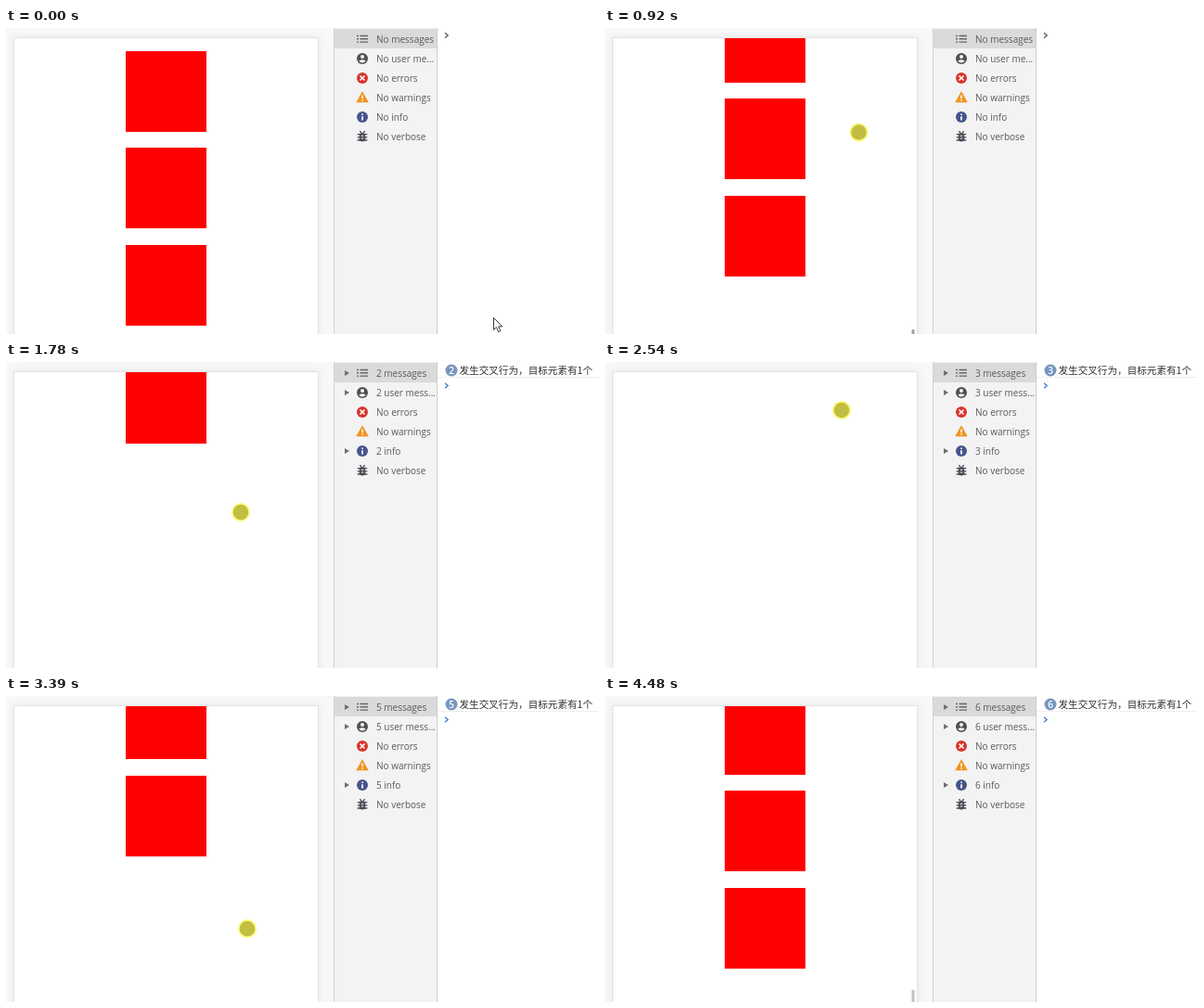
These frames come from a looping animation (639 px wide and 330 px high, 4.57 s). An HTML page:

```html
<!DOCTYPE html>
<html lang="en">
<head>
<meta charset="utf-8">
<title>Intersection demo</title>
<style>
  html, body { margin: 0; width: 100%; height: 100%; overflow: hidden; background: #fff; }
  svg { display: block; width: 639px; height: 330px; }
  .labels { font: 10px "Open Sans", "Noto Sans", sans-serif; fill: #5a5a5a; }
  .log { font: 10.6px "Noto Sans CJK SC", "Noto Sans CJK JP", sans-serif; fill: #303030; }
  .badge { font: 600 10px "Open Sans", sans-serif; fill: #fff; text-anchor: middle; }
  .card { filter: drop-shadow(0 0 5px rgba(0, 0, 0, .07)); }
  .crisp { shape-rendering: crispEdges; }
</style>
</head>
<body>
<svg viewBox="0 0 639 330">
  <defs>
    <clipPath id="view"><rect x="9" y="11" width="327" height="319"/></clipPath>
    <clipPath id="head"><circle r="6"/></clipPath>
  </defs>

  <!-- page -->
  <rect width="353" height="330" fill="#f8f8f8"/>
  <rect class="card" x="8.5" y="10.5" width="328" height="340" fill="#fff" stroke="#e3e3e3"/>
  <g clip-path="url(#view)">
    <g id="boxes" class="crisp" fill="#f00"></g>
    <rect id="thumb" x="330.5" width="3" height="200"/>
  </g>

  <!-- sidebar -->
  <g class="crisp">
    <rect x="353" width="111" height="330" fill="#f3f3f3"/>
    <rect x="354" y="1" width="110" height="21" fill="#dadada"/>
    <rect x="353" width="1" height="330" fill="#d2d2d2"/>
    <rect x="464" width="1" height="330" fill="#cdcdcd"/>
  </g>
  <path id="arrows" fill="#6e6e6e" d="M365 9l5 3-5 3zM365 30l5 3-5 3zM365 93l5 3-5 3z"/>
  <path d="M378 8.5h2m1.5 0h8.5M378 11.8h2m1.5 0h8.5M378 15.1h2m1.5 0h8.5" stroke="#666" stroke-width="1.4"/>
  <g transform="translate(384 33)">
    <circle r="6" fill="#505050"/>
    <g fill="#f3f3f3" clip-path="url(#head)">
      <circle cy="-2" r="2"/>
      <path d="M-3.7 2.6q3.7-2.6 7.4 0q-1.5 2-3.7 2t-3.7-2z"/>
    </g>
  </g>
  <g transform="translate(384 54)">
    <circle r="6" fill="#d8352c"/>
    <path d="M-2.5-2.5l5 5m0-5l-5 5" stroke="#fff" stroke-width="1.6"/>
  </g>
  <g transform="translate(384 75)">
    <path d="M0-6.3L6.3 5H-6.3z" fill="#f0931f" stroke="#f0931f" stroke-width=".6" stroke-linejoin="round"/>
    <path d="M0-2.5v3.7m0 1.1v1.5" stroke="#fff" stroke-width="1.5"/>
  </g>
  <g transform="translate(384 96)">
    <circle r="6" fill="#47558c"/>
    <path d="M0-3.6v1.7m0 1.1v4.2" stroke="#fff" stroke-width="1.7"/>
  </g>
  <g transform="translate(384 117)" stroke="#484a55" fill="none">
    <rect x="-3.2" y="-4" width="6.4" height="9.5" rx="3.2" fill="#484a55" stroke="none"/>
    <path d="M-5.3-2.4H5.3M-5.3.8H5.3M-5.3 4H5.3M-2.7-5.8L-1-4M2.7-5.8L1-4" stroke-width="1.3"/>
    <path d="M-1.3-.7h2.6M-1.3 2h2.6" stroke="#f3f3f3"/>
  </g>
  <g class="labels">
    <text id="messages" x="399" y="16"></text>
    <text id="users" x="399" y="37"></text>
    <text x="399" y="58">No errors</text>
    <text x="399" y="79">No warnings</text>
    <text id="info" x="399" y="100"></text>
    <text x="399" y="121">No verbose</text>
  </g>

  <!-- console -->
  <g id="log">
    <rect class="crisp" x="465" y="16" width="174" height="1" fill="#efefef"/>
    <text id="line" class="log" y="13">发生交叉行为，目标元素有1个</text>
    <g id="badge">
      <circle cx="480" cy="9" r="6.5" fill="#7896bf"/>
      <text id="count" class="badge" x="480" y="12.6"></text>
    </g>
  </g>
  <path id="prompt" d="M473-2.8l3.2 2.8-3.2 2.8" fill="none" stroke-width="1.4"/>

  <!-- pointer -->
  <path id="cursor" d="M.5.5v13l3-2.8 2.2 5 2.2-1-2.2-4.8h4z" fill="#fff" stroke="#222" stroke-width=".9"/>
  <g id="touch">
    <circle id="ring" r="10" fill="#fdfa78"/>
    <circle id="dot" r="8.3"/>
  </g>
</svg>
<script>
  const LOOP = 4570, STEP = 77, LAST = 58, GAP = 104.6;

  // step, pointer x, pointer y, top of the first box
  const path = [
    [0, 525, 312, 24.6], [1, 480, 270, 24.6], [3, 318, 168, 24.6], [4, 293, 165.7, 24.6],
    [9, 293, 219, 77.9], [10, 290, 208, 67], [14, 257, 17, -124],
    [15, 254, 62, -131], [16, 255, 115, -135], [17, 268, 165, -138],
    [19, 290, 232, -138], [21, 270, 195, -175.2], [23, 253, 162, -208.2],
    [26, 255, 98, -272.2], [27, 256.5, 86, -300], [28, 257, 91, -322.4],
    [31, 256, 52, -322.4], [33, 255, 52, -322.4], [39, 257, 174, -200.4],
    [44, 260, 251, -123.4], [46, 262, 283, -91.4], [53, 268, 372, -2.2], [LAST, 268, 372, -2.2]
  ];
  const logAt = [14, 22, 29, 36, 41, 48];
  const pressed = [[4, 14], [19, 26], [33, LAST]];

  const $ = id => document.getElementById(id);
  const set = (id, attrs) => {
    for (const k in attrs) $(id).setAttribute(k, attrs[k]);
  };
  const show = (id, on) => set(id, { visibility: on ? 'inherit' : 'hidden' });

  const boxes = [0, 1, 2].map(() => {
    const r = document.createElementNS('http://www.w3.org/2000/svg', 'rect');
    r.setAttribute('x', 129);
    r.setAttribute('width', 87);
    r.setAttribute('height', 87);
    return $('boxes').appendChild(r);
  });

  function pose(n) {
    const i = Math.max(1, path.findIndex(p => p[0] >= n));
    const a = path[i - 1], b = path[i], k = (n - a[0]) / (b[0] - a[0]);
    return [1, 2, 3].map(c => a[c] + (b[c] - a[c]) * k);
  }

  function draw(n) {
    const [x, y, top] = pose(n);
    const count = logAt.filter(s => s <= n).length;
    const down = pressed.some(([a, b]) => n >= a && n <= b);
    const onPage = x < 353;

    boxes.forEach((r, i) => r.setAttribute('y', Math.round(top + i * GAP)));
    set('thumb', { y: 292 + (77.9 - top) * 0.312, fill: n < LAST ? '#a0a0a0' : '#c2c2c2' });
    show('thumb', n > 4);

    const at = `translate(${x} ${y})`;
    set('cursor', { transform: at });
    set('touch', { transform: at });
    show('cursor', !onPage);
    show('touch', onPage);
    show('ring', onPage && down);
    set('dot', { fill: down ? '#c2be42' : '#8f8f8f' });

    const num = count || 'No';
    $('messages').textContent = `${num} message${count === 1 ? '' : 's'}`;
    $('users').textContent = `${num} user me${count ? 'ss' : ''}...`;
    $('info').textContent = `${num} info`;
    $('count').textContent = count;
    show('arrows', count > 0);
    show('log', count > 0);
    show('badge', count > 1);
    set('line', { x: count > 1 ? 488.5 : 484.5 });
    set('prompt', {
      transform: `translate(0 ${count ? 25.5 : 8})`,
      stroke: count ? '#4a80cf' : '#606060'
    });
  }

  const start = performance.now();
  function tick() {
    const t = (performance.now() - start) % LOOP;
    draw(Math.min(LAST, Math.floor((t + 9) / STEP)));
    requestAnimationFrame(tick);
  }
  tick();
</script>
</body>
</html>
```
